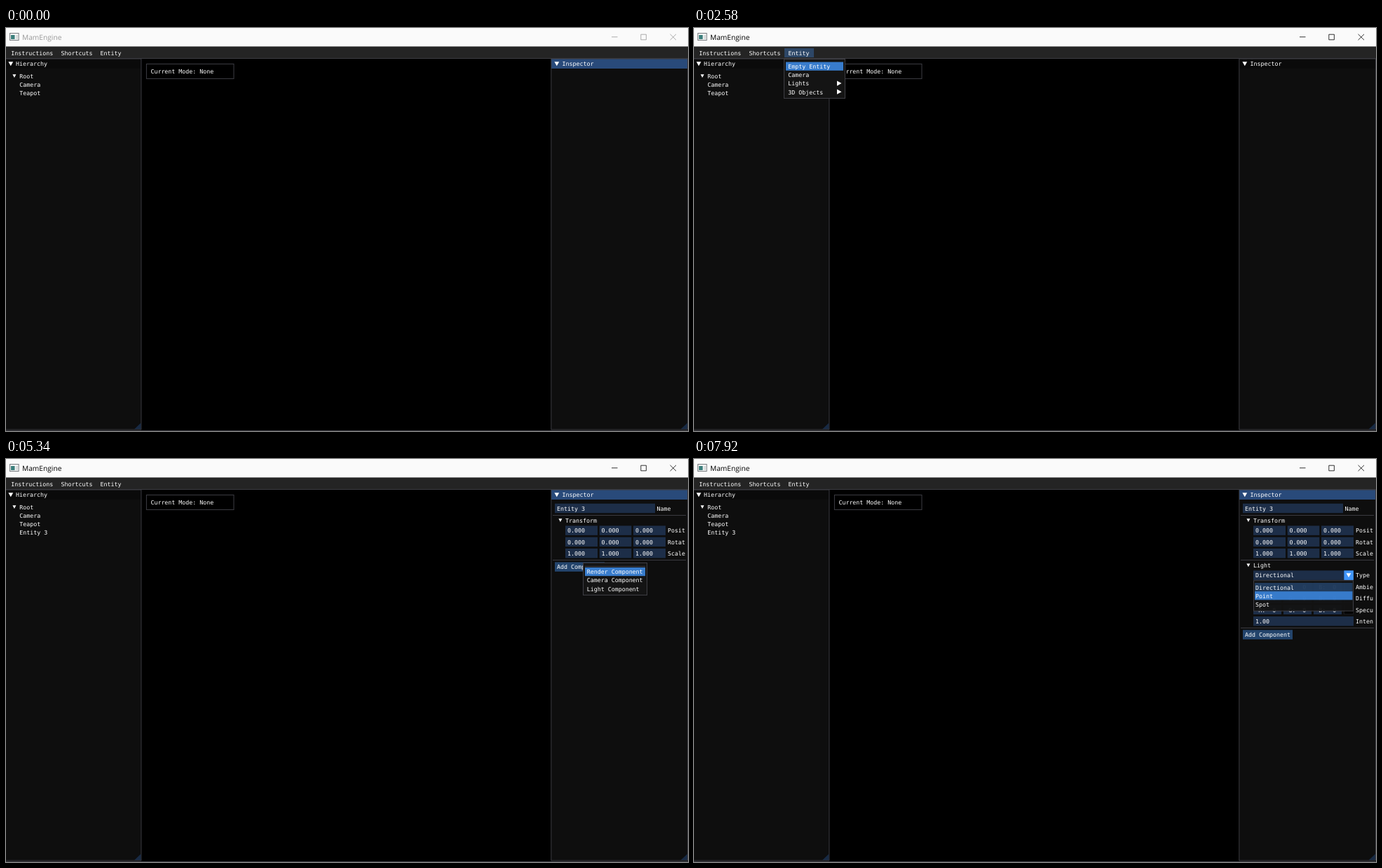
An HTML page for the animation above (8 s loop, 973 px wide and 576 px high).

```html
<!DOCTYPE html>
<html lang="en">
<head>
<meta charset="utf-8">
<title>Engine editor</title>
<style>
  html, body { margin: 0; width: 100%; height: 100%; overflow: hidden; background: #000; }
  svg { display: block; width: 973px; height: 576px; }
  text { font: 8.3px "DejaVu Sans Mono", monospace; fill: #fff; white-space: pre; text-rendering: geometricPrecision; }

  .panel { fill: #0e0e0e; }
  .popup { fill: #141414; fill-opacity: .95; }
  .bar { fill: #0a0a0a; }
  .bar-on { fill: #294a7a; }
  .line { fill: #3b3b41; }
  .edge { fill: none; stroke: #3e3e44; }
  .field { fill: #1d2e48; }
  .over { fill: #23446c; }
  .grip { fill: #182a44; }
  .head { fill: #4296fa; fill-opacity: .31; }
  .hot { fill: #4296fa; fill-opacity: .8; }
  .tri { fill: #fff; }

  /* Hard cuts on an 8 s loop: 1% = 80 ms */
  [class*="t-"] { animation: 8s step-end infinite; }
  .t-caption { animation-name: caption; }
  .t-row { animation-name: row; }
  .t-entity { animation-name: entity; }
  .t-menu { animation-name: menu; }
  .t-pick { animation-name: pick; }
  .t-focus { animation-name: focus; }
  .t-created { animation-name: created; }
  .t-add { animation-name: add; }
  .t-button { animation-name: button; }
  .t-list { animation-name: list; }
  .t-choice { animation-name: choice; }
  .t-light { animation-name: light; }
  .t-drag { animation-name: drag; }
  .t-combo { animation-name: combo; }
  .t-arrow { animation-name: arrow; }
  .t-drop { animation-name: drop; }
  .t-type { animation-name: type; }

  @keyframes caption { 0% { color: #999 } 21.75% { color: #000 } }
  @keyframes row {
    0% { opacity: 0 }
    12% { opacity: 1; transform: translateY(12px) }
    13.5% { opacity: 1; transform: none }
    15% { opacity: 0 }
  }
  @keyframes entity {
    0% { opacity: 0 }
    18.75% { opacity: 1; fill-opacity: .8 }
    27% { opacity: 1; fill-opacity: .31 }
    41.25% { opacity: 0 }
  }
  @keyframes menu { 0% { opacity: 0 } 21.75% { opacity: 1 } 41.25% { opacity: 0 } }
  @keyframes pick {
    0% { opacity: 0 }
    27.75% { opacity: 1; transform: none }
    29.25% { opacity: 1; transform: translateY(12px) }
    32.25% { opacity: 1; transform: none }
  }
  @keyframes focus { 0% { opacity: 1 } 21.75% { opacity: 0 } 41.25% { opacity: 1 } }
  @keyframes created { 0% { opacity: 0 } 41.25% { opacity: 1 } }
  @keyframes add { 0% { opacity: 0 } 41.25% { opacity: 1 } 80.25% { opacity: 0 } }
  @keyframes button {
    0% { fill: #23446c }
    57.75% { fill: #4296fa }
    61.5% { fill: #0f87fa }
    63% { fill: #23446c }
  }
  @keyframes list { 0% { opacity: 0 } 63% { opacity: 1 } 80.25% { opacity: 0 } }
  @keyframes choice {
    0% { opacity: 0 }
    66.75% { opacity: 1; transform: none }
    67.5% { opacity: 1; transform: translateY(12px) }
    70.5% { opacity: 1; transform: translateY(24px) }
    78.75% { opacity: 1; transform: translateY(24px); fill-opacity: 1 }
  }
  @keyframes light { 0% { opacity: 0 } 80.25% { opacity: 1 } }
  @keyframes drag { 0% { opacity: 0 } 80.25% { opacity: 1 } 86.25% { opacity: 0 } }
  @keyframes combo { 0% { opacity: 0 } 87% { opacity: 1 } 92.25% { opacity: 0 } }
  @keyframes arrow { 0% { fill: #23446c } 87% { fill: #4296fa } }
  @keyframes drop { 0% { opacity: 0 } 92.25% { opacity: 1 } }
  @keyframes type {
    0% { opacity: 0 }
    98.25% { opacity: 1; transform: none }
    99% { opacity: 1; transform: translateY(12px) }
  }
</style>
</head>
<body>
<svg viewBox="0 0 973 576">
  <defs>
    <path id="down" class="tri" d="M0 0h6.8l-3.4 6z"/>
    <path id="node" class="tri" d="M0 0h5l-2.5 4.8z"/>
    <path id="side" class="tri" d="M0 0l6.5 3.6l-6.5 3.6z"/>
    <g id="axes">
      <rect class="field" x="798" width="46" height="13.5"/>
      <rect class="field" x="846.7" width="45.6" height="13.5"/>
      <rect class="field" x="895" width="46" height="13.5"/>
    </g>
    <g id="zeros">
      <text x="801" y="9.3">0.000</text>
      <text x="849.5" y="9.3">0.000</text>
      <text x="898" y="9.3">0.000</text>
    </g>
    <g id="ones">
      <text x="801" y="9.3">1.000</text>
      <text x="849.5" y="9.3">1.000</text>
      <text x="898" y="9.3">1.000</text>
    </g>
    <g id="boxes">
      <rect class="field" x="798" width="40" height="13.5"/>
      <rect class="field" x="841" width="40" height="13.5"/>
      <rect class="field" x="884" width="40" height="13.5"/>
      <rect x="927.5" y=".4" width="13" height="12.7" fill="#000" stroke="#1b1b1e"/>
    </g>
    <g id="rgb">
      <text x="805.3" y="9.3">R:  0</text>
      <text x="848.3" y="9.3">G:  0</text>
      <text x="891.3" y="9.3">B:  0</text>
    </g>
    <g id="add">
      <text x="786" y="10.3">Add Component</text>
    </g>
  </defs>

  <rect width="973" height="576" fill="#000"/>

  <!-- Caption and menu bar -->
  <rect y="26" width="973" height="17" fill="#242424"/>
  <rect width="973" height="26.4" fill="#fafafa"/>
  <rect x="5.5" y="7.5" width="12.6" height="10" fill="#f4f4f4" stroke="#777c80"/>
  <rect x="7" y="10" width="5.5" height="6" fill="#3c7f7c"/>
  <rect x="14.5" y="10" width="2" height="6" fill="#cfd4d4"/>
  <g class="t-caption" fill="none" stroke="currentColor">
    <text x="23" y="17.4" style="font: 10.2px 'Open Sans', sans-serif; fill: currentColor; stroke: none">MamEngine</text>
    <path d="M864 12.8h8.5M905.8 9.2h7.6v7.6h-7.6zM947.5 8.8l8.5 8.4M956 8.8l-8.5 8.4" stroke-width=".8"/>
  </g>
  <rect class="line" y="43" width="973" height="1"/>
  <rect class="head t-entity" x="129" y="29" width="42" height="13"/>
  <text x="7.3" y="38.8">Instructions</text>
  <text x="78.5" y="38.8">Shortcuts</text>
  <text x="134.6" y="38.8">Entity</text>

  <!-- Hierarchy -->
  <rect class="panel" y="44" width="193" height="530"/>
  <rect class="bar" y="44" width="193" height="14"/>
  <rect class="line" y="43.5" width="193" height="1"/>
  <rect class="line" x="192.4" y="44" width="1" height="530"/>
  <path class="grip" d="M192.4 564.5v9h-9.5z"/>
  <rect class="line" y="573.5" width="193" height="1"/>
  <rect class="hot t-row" x="16" y="62" width="175" height="13"/>
  <use href="#down" x="3.4" y="48.2"/>
  <text x="14" y="54.4">Hierarchy</text>
  <use href="#node" x="9.4" y="66.2"/>
  <text x="19.3" y="71.7">Root</text>
  <text x="19.3" y="83.8">Camera</text>
  <text x="19.3" y="95.9">Teapot</text>
  <text class="t-created" x="19.3" y="108">Entity 3</text>

  <!-- Viewport -->
  <rect class="edge" x="200.4" y="51.4" width="124.6" height="21"/>
  <text x="206.4" y="65.3">Current Mode: None</text>

  <!-- Inspector -->
  <rect class="panel" x="778" y="44" width="195" height="530"/>
  <rect class="bar" x="778" y="44" width="194" height="14"/>
  <rect class="bar-on t-focus" x="778" y="44" width="194" height="14"/>
  <rect class="line" x="777.5" y="43.5" width="195" height="1"/>
  <rect class="line" x="777.3" y="44" width="1" height="530"/>
  <rect class="line" x="972" y="44" width="1" height="530"/>
  <path class="grip" d="M972 564.5v9h-9.5z"/>
  <rect class="line" x="777.5" y="573.5" width="195" height="1"/>
  <rect class="line" y="575" width="973" height="1"/>
  <use href="#down" x="782.4" y="48.2"/>
  <text x="793.5" y="54.4">Inspector</text>

  <g class="t-created">
    <rect class="field" x="783" y="63.7" width="143" height="13.5"/>
    <text x="786" y="73.6">Entity 3</text>
    <text x="928.6" y="73.6">Name</text>
    <rect class="line" x="780" y="80" width="190" height="1"/>
    <use href="#node" x="788.4" y="85.3"/>
    <text x="798" y="90.8">Transform</text>
    <use href="#axes" y="95.4"/><use href="#zeros" y="96"/>
    <use href="#axes" y="111.7"/><use href="#zeros" y="112.3"/>
    <use href="#axes" y="128"/><use href="#ones" y="128.6"/>
    <text x="944" y="105.3">Posit</text>
    <text x="944" y="121.6">Rotat</text>
    <text x="944" y="137.9">Scale</text>
    <rect class="line" x="780" y="144" width="190" height="1"/>
  </g>

  <g class="t-add">
    <rect class="t-button" x="783" y="147.4" width="71" height="13.5" fill="#23446c"/>
    <use href="#add" y="147"/>
  </g>

  <!-- Light component -->
  <g class="t-light">
    <use href="#node" x="788.4" y="149.5"/>
    <text x="798" y="155">Light</text>
    <rect class="field" x="798" y="159.4" width="143" height="13.5"/>
    <rect class="over t-combo" x="798" y="159.4" width="130" height="13.5"/>
    <rect class="t-arrow" x="927.4" y="159.4" width="13.5" height="13.5"/>
    <use href="#down" x="930.6" y="163.2"/>
    <text x="801" y="169.4">Directional</text>
    <use href="#boxes" y="175.8"/>
    <rect class="over t-drag" x="841" y="175.8" width="40" height="13.5"/>
    <use href="#rgb" y="176.4"/>
    <use href="#boxes" y="192.2"/><use href="#rgb" y="192.9"/>
    <use href="#boxes" y="208.6"/><use href="#rgb" y="209.3"/>
    <rect class="field" x="798" y="225" width="143" height="13.5"/>
    <text x="801" y="234.9">1.00</text>
    <text x="944" y="169.4">Type</text>
    <text x="944" y="185.8">Ambie</text>
    <text x="944" y="202.2">Diffu</text>
    <text x="944" y="218.6">Specu</text>
    <text x="944" y="234.9">Inten</text>
    <rect class="line" x="780" y="241" width="190" height="1"/>
    <rect class="over" x="783" y="244.3" width="71" height="13.5"/>
    <use href="#add" y="244.2"/>
  </g>

  <!-- Type list -->
  <g class="t-drop">
    <rect class="popup" x="798" y="173.5" width="143" height="43.5"/>
    <rect class="edge" x="798.5" y="173.8" width="142" height="43.4"/>
    <rect class="head" x="800" y="177" width="139.5" height="12.3"/>
    <rect class="hot t-type" x="800" y="177.2" width="139.5" height="12.2"/>
    <text x="801" y="186.6">Directional</text>
    <text x="801" y="198.8">Point</text>
    <text x="801" y="210.9">Spot</text>
  </g>

  <!-- Component list -->
  <g class="t-list">
    <rect class="popup" x="824" y="148" width="90" height="47" style="fill-opacity: 1"/>
    <rect class="edge" x="823.5" y="148.5" width="91" height="46"/>
    <rect class="line" x="826" y="153" width="86" height="1"/>
    <rect class="hot t-choice" x="826" y="155" width="86" height="12.2"/>
    <text x="828.7" y="164.3">Render Component</text>
    <text x="828.7" y="176.4">Camera Component</text>
    <text x="828.7" y="188.5">Light Component</text>
  </g>

  <!-- Entity menu -->
  <g class="t-menu">
    <rect class="popup" x="128" y="44" width="88" height="57" style="fill-opacity: 1"/>
    <rect class="edge" x="128.5" y="44.5" width="87" height="56"/>
    <rect class="hot t-pick" x="131" y="48.6" width="82" height="12.2"/>
    <text x="134.3" y="58.2">Empty Entity</text>
    <text x="134.3" y="70.3">Camera</text>
    <text x="134.3" y="82.4">Lights</text>
    <text x="134.3" y="94.5">3D Objects</text>
    <use href="#side" x="204" y="75.5"/>
    <use href="#side" x="204" y="87.6"/>
  </g>
</svg>
</body>
</html>
```
